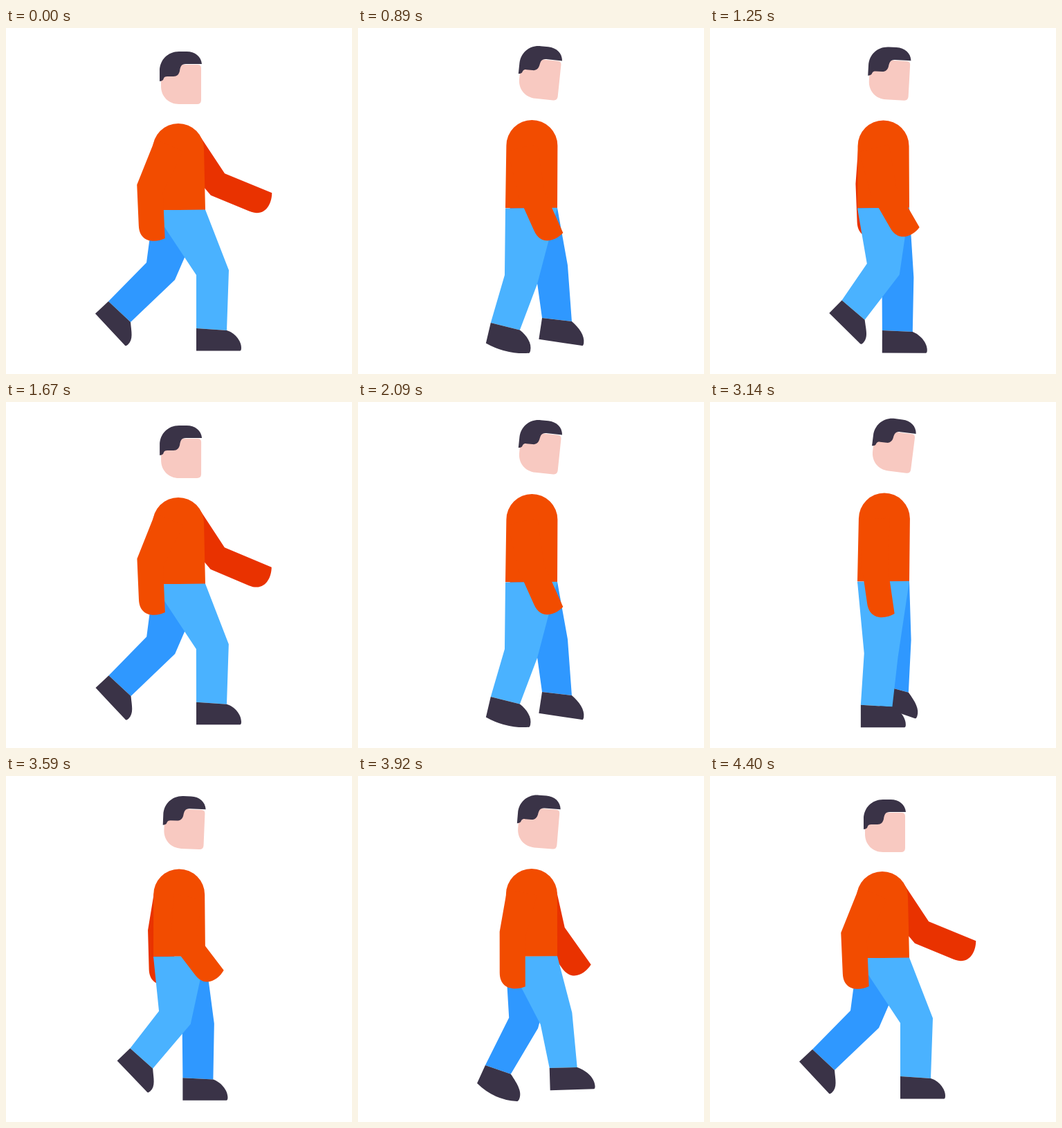
These frames come from a looping animation (500 by 500 pixels, 4.43 s). An HTML page with a canvas:

```html
<!DOCTYPE html>
<html lang="en">
<head>
<meta charset="utf-8">
<title>Walk cycle</title>
<style>
  html, body { margin: 0; width: 100%; height: 100%; overflow: hidden; background: #fff; }
  canvas { display: block; width: 500px; height: 500px; }
</style>
</head>
<body>
<canvas id="stage" width="500" height="500"></canvas>
<script>
const ctx = document.getElementById('stage').getContext('2d');

const LOOP = 4430, HOLD = 530, STEP = 30, WALK_END = 120, CYCLE = 40;
const KEY_TIMES = [0, 5, 10, 20, 25, 30, 40];
const COLORS = {
  hair: '#3a3347', skin: '#f8c9c1', shirt: '#f24c00', farArm: '#e93200',
  leg: '#4ab2ff', farLeg: '#2f98ff', shoe: '#3a3347'
};

// Body: head x, head y, head tilt, shoulder x, shoulder top, hip y (one step)
const BODY = [
  [252, 80, 0, 249, 138, 263],
  [257.8, 73.6, 3, 250.5, 133.5, 260],
  [265, 69, 8.3, 252.3, 131, 259]
];

// Leg: front knee, back knee, front ankle, back ankle, foot tilt
const NEAR_LEG = [
  [322, 350, 275, 357, 319, 437, 275, 434, 0],
  [295, 360, 249, 360, 294, 439, 250, 437, 0],
  [265, 372, 215.5, 364, 255, 441, 209, 438, 0],
  [244, 364, 203, 339, 180, 425, 148, 395, 47],
  [273, 357, 226, 340, 221, 422, 188, 393, 46],
  [300, 336, 255.5, 361, 315, 409, 278, 413, -3]
];
const FAR_LEG = NEAR_LEG.slice();
FAR_LEG[2] = [272, 365, 229.5, 357, 251, 435, 210.5, 435, 8];
FAR_LEG[5] = [295.5, 340, 253, 375, 305, 419, 262.5, 413, 12];

// Arm: elbow x, elbow y, forearm angle from straight down, forearm length
const NEAR_ARM = [
  [208, 232, 2.5, 73],
  [228, 230, 2, 72],
  [241, 241, 10, 70],
  [274, 231.5, 60, 75],
  [251, 235, 31, 72],
  [234.4, 227, -1.7, 76.6]
];
const FAR_ARM = [
  [208, 222, 0, 72],
  [228, 228, 2, 72],
  [266, 231, 11.5, 59],
  [306, 226, 67.6, 77],
  [272, 228, 33, 70],
  [250, 230, 0, 73]
];

const rad = deg => deg * Math.PI / 180;
const ease = u => u * u * (3 - 2 * u);

function pose(keys, phase) {
  let i = 0;
  while (phase >= KEY_TIMES[i + 1]) i++;
  const u = ease((phase - KEY_TIMES[i]) / (KEY_TIMES[i + 1] - KEY_TIMES[i]));
  const next = keys[(i + 1) % keys.length];
  return keys[i].map((v, k) => v + (next[k] - v) * u);
}

function shape(color, draw) {
  ctx.fillStyle = color;
  ctx.beginPath();
  draw();
  ctx.closePath();
  ctx.fill();
}

function polygon(color, points) {
  shape(color, () => points.forEach(([x, y]) => ctx.lineTo(x, y)));
}

function drawLeg(keys, phase, hip, color) {
  const [kfx, kfy, kbx, kby, afx, afy, abx, aby, tilt] = pose(keys, phase);
  polygon(color, [[213, hip + 0.5], [288, hip - 0.5], [kfx, kfy], [afx, afy], [abx, aby], [kbx, kby]]);

  const c = Math.cos(rad(tilt)), s = Math.sin(rad(tilt));
  const at = (x, y) => [abx + x * c - y * s, aby + x * s + y * c];
  const height = 32.5 - 6.5 * Math.min(1, Math.abs(tilt) / 40);
  const push = phase > 10 && phase < 20 ? Math.sin(Math.PI * ease((phase - 10) / 10)) : 0;
  shape(COLORS.shoe, () => {
    ctx.moveTo(abx, aby);
    ctx.lineTo(...at(0, height));
    ctx.quadraticCurveTo(...at(32, height + 12 * push), ...at(63, height));
    ctx.quadraticCurveTo(...at(65, height), ...at(65, height - 4));
    ctx.bezierCurveTo(...at(65, height - 15), ...at(55, 6), afx, afy);
  });
}

function tangent(cx, cy, r, x, y, side) {
  const angle = Math.atan2(y - cy, x - cx) + side * Math.acos(r / Math.hypot(x - cx, y - cy));
  return [cx + r * Math.cos(angle), cy + r * Math.sin(angle)];
}

function drawArm(keys, phase, sx, sy, color) {
  const [ex, ey, deg, length] = pose(keys, phase);
  const half = 18.5, fore = rad(deg), upper = Math.atan2(ex - sx, ey - sy);
  const mid = (fore + upper) / 2, miter = half / Math.cos((fore - upper) / 2);
  const mx = miter * Math.cos(mid), my = -miter * Math.sin(mid);
  const c = Math.cos(fore), s = Math.sin(fore);
  const at = (along, across) => [ex + along * s + across * c, ey + along * c - across * s];
  const forward = ex > sx;
  shape(color, () => {
    ctx.moveTo(...tangent(sx, sy, forward ? 36 : 8, ex + mx, ey + my, -1));
    ctx.lineTo(ex + mx, ey + my);
    ctx.lineTo(...at(length, half));
    ctx.bezierCurveTo(...at(length + 6, half - 14), ...at(length + 5, -half), ...at(length - 20, -half));
    ctx.lineTo(ex - mx, ey - my);
    ctx.lineTo(...tangent(sx, sy, forward ? 8 : 36, ex - mx, ey - my, 1));
  });
}

function drawTorso(x, top, hip) {
  const r = 37;
  shape(COLORS.shirt, () => {
    ctx.moveTo(213, hip);
    ctx.arc(x, top + r, r, Math.PI, 0);
    ctx.lineTo(288, hip);
  });
}

function drawHead(x, y, tilt) {
  ctx.save();
  ctx.translate(x, y);
  ctx.rotate(rad(tilt));
  shape(COLORS.skin, () => {
    ctx.moveTo(-28, -27);
    ctx.lineTo(25, -27);
    ctx.quadraticCurveTo(30, -27, 30, -22);
    ctx.lineTo(30, 24);
    ctx.quadraticCurveTo(30, 30, 24, 30);
    ctx.lineTo(-2, 30);
    ctx.bezierCurveTo(-17, 30, -28, 19, -28, 4);
  });
  shape(COLORS.hair, () => {
    ctx.moveTo(-30, -3);
    ctx.lineTo(-30, -18);
    ctx.bezierCurveTo(-30, -34, -18, -46, -2, -46);
    ctx.lineTo(9, -46);
    ctx.bezierCurveTo(21, -46, 30, -39, 31, -28);
    ctx.lineTo(8, -28);
    ctx.bezierCurveTo(1, -28, 0, -24, -1, -18);
    ctx.bezierCurveTo(-2, -13, -5, -10, -10, -10);
    ctx.lineTo(-19, -10);
    ctx.bezierCurveTo(-24, -10, -24, -7, -25, -5);
    ctx.quadraticCurveTo(-27, -3, -30, -3);
  });
  ctx.restore();
}

function draw(time) {
  const step = time < HOLD ? 0 : Math.floor((time - HOLD) / STEP) + 1;
  const phase = (step ? Math.min(step + 0.5, WALK_END) : 0) % CYCLE;
  const farPhase = (phase + CYCLE / 2) % CYCLE;
  const [hx, hy, tilt, sx, top, hip] = pose(BODY, phase % (CYCLE / 2));
  const sy = top + 36;

  ctx.fillStyle = '#fff';
  ctx.fillRect(0, 0, 500, 500);
  drawArm(FAR_ARM, farPhase, sx, sy, COLORS.farArm);
  drawLeg(FAR_LEG, farPhase, hip, COLORS.farLeg);
  drawTorso(sx, top, hip);
  drawLeg(NEAR_LEG, phase, hip, COLORS.leg);
  drawArm(NEAR_ARM, phase, sx, sy, COLORS.shirt);
  drawHead(hx, hy, tilt);
}

const start = performance.now();
function tick() {
  draw((performance.now() - start) % LOOP);
  requestAnimationFrame(tick);
}
tick();
</script>
</body>
</html>
```
